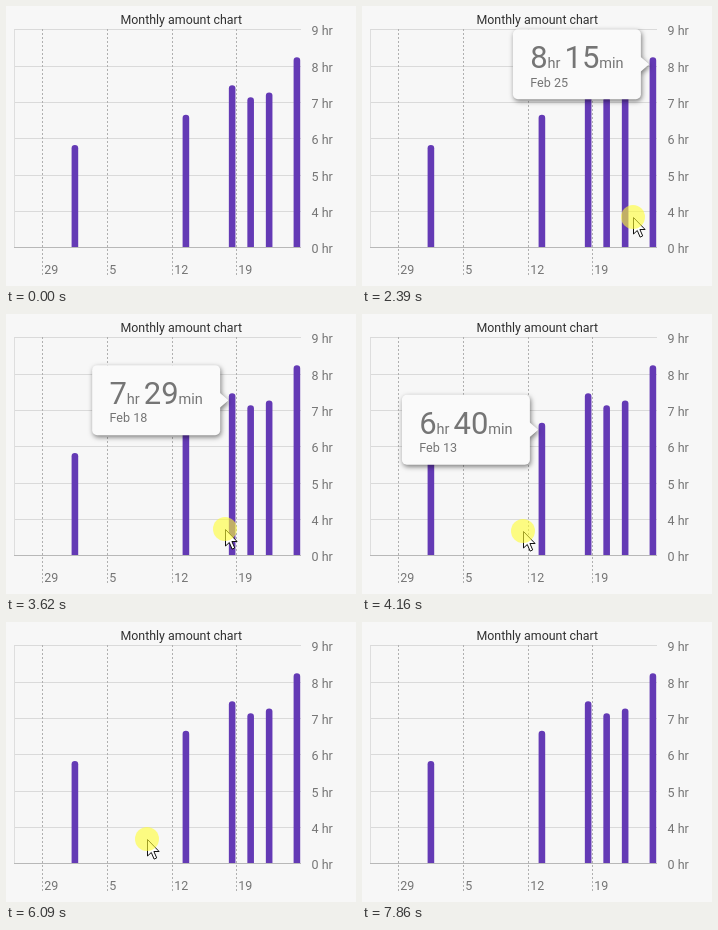
Recreate the animation shown at these times as an HTML page with a canvas. Size 350 px wide and 280 px high, loop 9.65 s.

```html
<!DOCTYPE html>
<html lang="en">
<head>
<meta charset="utf-8">
<title>Monthly amount chart</title>
<style>
html, body { margin: 0; width: 100%; height: 100%; overflow: hidden; background: #f7f7f7; }
canvas { display: block; width: 350px; height: 280px; }
</style>
</head>
<body>
<canvas id="stage"></canvas>
<script>
const W = 350, H = 280, LOOP = 9650;
const LEFT = 8, RIGHT = 295, TOP = 23.9, BASE = 241.5;
const DAY = 9.25, HOUR = 36.3, SHIFT = 37;
const GREY = '#757575';

const canvas = document.getElementById('stage');
const ctx = canvas.getContext('2d');
const dpr = window.devicePixelRatio || 1;
canvas.width = W * dpr;
canvas.height = H * dpr;

// day counts from February 1, total in minutes
const bars = [[-10, 250], [0, 350], [12, 400], [17, 449], [19, 429], [21, 437], [24, 495]]
  .map(([day, total]) => ({
    day, total,
    x: 68.9 + day * DAY,
    y: 205.6 - (total / 60 - 4) * HOUR
  }));

// pointer glides: first tick, last tick, end x, end y
const glides = [
  [0, 5, 290, 208], [22, 30, 262, 212], [32, 35, 240, 215], [36, 41, 222, 215],
  [42, 50, 161, 217], [50, 58, 68, 213], [60, 63, 92, 220], [68, 75, 141, 217],
  [75, 80, 233, 212], [81, 87, 266, 212], [92, 97, 20, 214]
];

function ease(k, from, to) {
  const p = Math.min(1, Math.max(0, (k - from) / (to - from)));
  return p * p * (3 - 2 * p);
}

function pointerAt(k) {
  let x = 320, y = 272;
  for (const [from, to, gx, gy] of glides) {
    const p = ease(k, from, to);
    x += (gx - x) * p;
    y += (gy - y) * p;
  }
  return [Math.round(x), Math.round(y)];
}

const isPressed = k => (k >= 11 && k < 61) || (k >= 75 && k < 80) || k >= 93;
const scrollAt = k => SHIFT * (ease(k, 75, 80) - ease(k, 92, 98));

// the bar nearest to the held pointer, from long press to release
function tipAt(k) {
  if (k < 19 || k > 65) return null;
  const x = pointerAt(Math.min(k, 60))[0] + 7.5;
  return bars.reduce((a, b) => Math.abs(b.x - x) < Math.abs(a.x - x) ? b : a);
}

function setFont(size) {
  ctx.font = size + 'px Roboto, sans-serif';
}

function text(s, x, y, size, color = GREY, align = 'left') {
  setFont(size);
  ctx.textAlign = align;
  ctx.fillStyle = color;
  ctx.fillText(s, x, y);
}

function line(x1, y1, x2, y2, color, dash = []) {
  ctx.strokeStyle = color;
  ctx.lineWidth = 1;
  ctx.setLineDash(dash);
  ctx.beginPath();
  ctx.moveTo(x1, y1);
  ctx.lineTo(x2, y2);
  ctx.stroke();
  ctx.setLineDash([]);
}

function drawChart(scroll) {
  text('Monthly amount chart', 175.3, 18, 12.4, '#303030', 'center');
  for (let i = 0; i < 7; i++) {
    const y = Math.floor(TOP + i * HOUR) + 0.5;
    if (i < 6) line(LEFT, y, RIGHT, y, '#dadada');
    text((i < 6 ? 9 - i : 0) + ' hr', 305.5, y + 5, 12.5);
  }
  line(LEFT + 0.5, TOP, LEFT + 0.5, BASE, '#dedede');

  ctx.save();
  ctx.beginPath();
  ctx.rect(LEFT, 20, RIGHT - LEFT, 255);
  ctx.clip();
  for (let day = -10; day < 24; day += 7) {
    const x = Math.floor(64.3 + day * DAY + scroll) + 0.5;
    line(x, 23, x, 269, '#b0b0b0', [2, 2]);
    text(day < 0 ? day + 32 : day + 1, x + 1.7, 267.8, 12.5);
  }
  ctx.fillStyle = '#643ab5';
  for (const { x, y } of bars) {
    ctx.beginPath();
    ctx.roundRect(x + scroll - 3.3, y, 6.6, BASE - y, [3.3, 3.3, 0, 0]);
    ctx.fill();
  }
  ctx.restore();
  line(LEFT, BASE, RIGHT, BASE, '#b8b8b8');
}

function drawTip(bar, alpha) {
  const w = 128, h = 70;
  const flip = bar.x < w + 20, side = flip ? -1 : 1;
  const edge = bar.x - side * 12;
  const x = flip ? edge : edge - w;
  const y = bar.y - 28, mid = y + h / 2;

  const box = new Path2D();
  box.roundRect(x, y, w, h, 5);
  const beak = new Path2D();
  beak.moveTo(edge - side, mid - 8);
  beak.lineTo(edge + side * 8, mid);
  beak.lineTo(edge - side, mid + 8);

  ctx.save();
  ctx.globalAlpha = alpha;
  ctx.shadowColor = 'rgba(0,0,0,.5)';
  ctx.shadowBlur = 5 * dpr;
  ctx.shadowOffsetX = dpr;
  ctx.shadowOffsetY = 2 * dpr;
  ctx.fillStyle = '#fafafa';
  ctx.fill(beak);
  ctx.fill(box);
  ctx.shadowColor = 'transparent';
  ctx.fill(beak);

  const big = 31, small = 14.5, gap = 4;
  const parts = [[Math.floor(bar.total / 60), big], ['hr', small], [bar.total % 60, big], ['min', small]];
  const widths = parts.map(([s, size]) => {
    setFont(size);
    return ctx.measureText(s).width + (s === 'hr' ? gap : 0);
  });
  const left = x + (w - widths.reduce((a, v) => a + v)) / 2;
  let tx = left;
  parts.forEach(([s, size], i) => {
    text(s, tx, y + 39, size);
    tx += widths[i];
  });
  text('Feb ' + (bar.day + 1), left, y + 57.3, 12.6);
  ctx.restore();
}

function drawPointer(x, y, pressed) {
  const arrow = [[0, 0], [0, 16.5], [3.8, 13], [6.6, 19.6], [9.2, 18.4], [6.4, 12], [11.6, 12]];
  ctx.beginPath();
  for (const [dx, dy] of arrow) ctx.lineTo(x + 0.5 + dx, y + 0.5 + dy);
  ctx.closePath();
  ctx.fillStyle = '#fff';
  ctx.fill();
  ctx.strokeStyle = '#111';
  ctx.lineWidth = 1;
  ctx.stroke();
  if (pressed) {
    ctx.fillStyle = 'rgba(255,253,50,.6)';
    ctx.beginPath();
    ctx.arc(x, y, 12, 0, Math.PI * 2);
    ctx.fill();
  }
}

function draw(t) {
  // the picture advances in ticks of about 77 ms
  const k = Math.floor((t - 290) / 77.2);
  ctx.setTransform(dpr, 0, 0, dpr, 0, 0);
  ctx.fillStyle = '#f7f7f7';
  ctx.fillRect(0, 0, W, H);
  drawChart(scrollAt(k));

  const tip = tipAt(k);
  const settled = tip === tipAt(k - 1) && tip === tipAt(Math.max(k + 1, 20));
  const fresh = tip !== tipAt(k - 1), leaving = !tipAt(k + 1);
  if (tip) drawTip(tip, fresh || leaving ? 0.5 : 1);

  if (k >= 0 && k < 97) drawPointer(...pointerAt(k), isPressed(k));
}

const start = performance.now();
function tick() {
  draw((performance.now() - start) % LOOP);
  requestAnimationFrame(tick);
}
tick();
</script>
</body>
</html>
```
